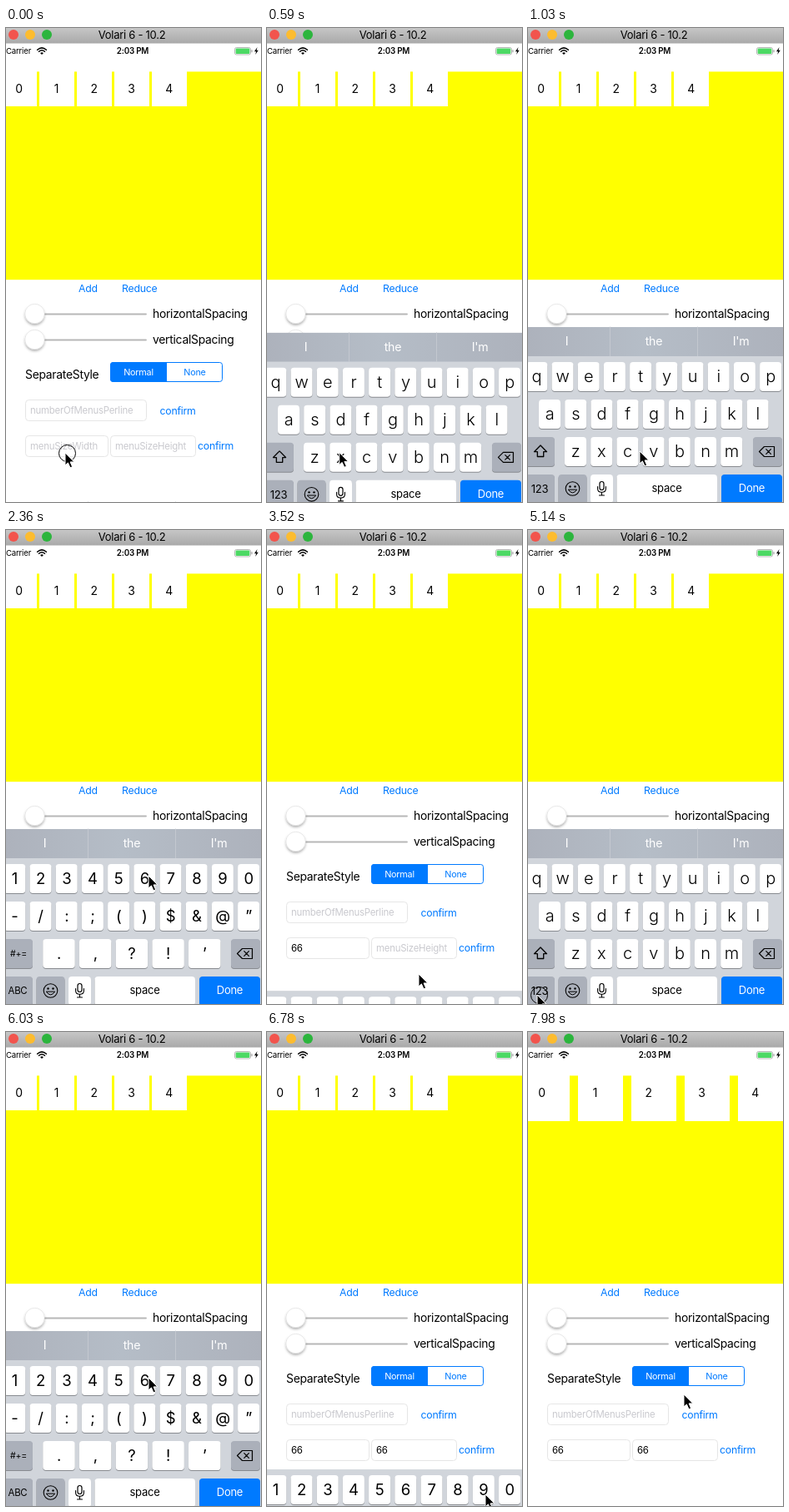
Write an HTML page that moves like this. It is 306 by 569 pixels and loops after 8000 ms.

```html
<!DOCTYPE html>
<html lang="en">
<head>
<meta charset="utf-8">
<title>Menu settings demo</title>
<style>
html, body { margin: 0; width: 100%; height: 100%; overflow: hidden; background: #fff }
svg { display: block }
text { font-family: Inter, "Open Sans", sans-serif; letter-spacing: -.02em; white-space: pre }
</style>
</head>
<body>
<svg id="stage" width="306" height="569" viewBox="0 0 306 569"></svg>
<script>
const BLUE = '#007aff', HINT = '#c9c9ce', KEY_DARK = '#abb0ba';
const STEP = 147, LOOP = 8000;
const $ = id => document.getElementById(id);

const rect = (x, y, w, h, fill, more = '') =>
  `<rect x="${x}" y="${y}" width="${w}" height="${h}" fill="${fill}" ${more}/>`;
const text = (x, y, size, str, fill = '#000', more = '') =>
  `<text x="${x}" y="${y}" font-size="${size}" fill="${fill}" ${more}>${str.replace('&', '&amp;')}</text>`;
const mid = (x, y, size, str, fill, more = '') =>
  text(x, y, size, str, fill, 'text-anchor="middle" ' + more);
const dot = (x, y, r, fill, more = '') =>
  `<circle cx="${x}" cy="${y}" r="${r}" fill="${fill}" ${more}/>`;
const line = (d, width = 1.3, color = '#000') =>
  `<path d="${d}" fill="none" stroke="${color}" stroke-width="${width}" stroke-linejoin="round" stroke-linecap="round"/>`;

// Window chrome and status bar
const header = () =>
  rect(0, 0, 306, 18.5, 'url(#chrome)') +
  ['#f2544d', '#fdbc2f', '#2cb53d'].map((c, i) => dot(9 + 20 * i, 8, 6, c)).join('') +
  mid(151, 13, 13, 'Volari 6 - 10.2') +
  text(0, 31, 9.6, 'Carrier') +
  line('M37.6 26.3Q43 21.4 48.4 26.3M39.5 28.3Q43 25.2 46.5 28.3', 1.5) +
  '<path d="M41 30Q43 28.4 45 30L43 32Z"/>' +
  mid(152, 31, 9.8, '2:03 PM', '#000', 'font-weight="600"') +
  rect(274.5, 23.5, 19, 8.5, 'none', 'rx="2" stroke="#a5a5a5" stroke-width=".8"') +
  rect(275.6, 24.6, 16.8, 6.3, '#4cd964', 'rx="1"') +
  rect(294.4, 26.2, 1.2, 3, '#a5a5a5') +
  '<path d="M301.5 23L298 28.3H300.2L299.2 32L302.8 26.8H300.6Z"/>';

const slider = (y, label) =>
  line(`M34 ${y + .5}H168`, 1.8, '#b7b7b7') +
  dot(34.5, y, 11.7, '#fff', 'stroke="#d4d4d4" stroke-width=".5" filter="url(#soft)"') +
  text(176, y + 5, 13.9, label);

const field = (x, y, w, hint, id) =>
  rect(x + .5, y + .5, w, 25, '#fff', 'rx="4" stroke="#e6e6e6"') +
  text(x + 6, y + 17, 11.4, hint, HINT, `id="${id}"`);

const form = () =>
  text(87, 316.5, 12.3, 'Add', BLUE) + text(139, 316.5, 12.3, 'Reduce', BLUE) +
  slider(343, 'horizontalSpacing') + slider(374, 'verticalSpacing') +
  text(23, 421, 13.9, 'SeparateStyle') +
  rect(125.5, 401.5, 134, 23, '#fff', `rx="3" stroke="${BLUE}"`) +
  `<path d="M193 401H129Q125 401 125 405V421Q125 425 129 425H193Z" fill="${BLUE}"/>` +
  mid(159, 417, 10.8, 'Normal', '#fff') + mid(226.5, 417, 10.8, 'None', BLUE) +
  field(23, 446, 145, 'numberOfMenusPerline', 'perLine') +
  field(23, 489, 99, 'menuSizeWidth', 'width') +
  field(125, 489, 102, 'menuSizeHeight', 'height') +
  text(184.5, 464, 12.3, 'confirm', BLUE) + text(230, 506, 12.3, 'confirm', BLUE);

// Keyboard
const key = (x, y, w, fill = '#fff') =>
  rect(x, y + 1, w, 35, '#888b90', 'rx="4"') + rect(x, y, w, 35, fill, 'rx="4"');
const row = (chars, x, y, pitch, w, size, weight = 400) => [...chars].map((c, i) => {
  const cx = x + i * pitch;
  return key(cx - w / 2, y, w) + mid(cx, y + 24, size, c, '#000', `font-weight="${weight}"`);
}).join('');

const letters = () =>
  row('qwertyuiop', 10.3, 401, 31.2, 26, 20, 300) +
  row('asdfghjkl', 26, 446, 31.2, 26, 20, 300) +
  row('zxcvbnm', 57, 491, 31.2, 26, 20, 300) +
  line('M15 501L7.5 508.7H11.3V514.5H18.7V508.7H22.5Z') +
  mid(14, 558, 13, '123');

const digits = () =>
  row('1234567890', 10.3, 401, 31.2, 26, 18.5) +
  row('-/:;()$&@”', 10.3, 446, 31.2, 26, 18.5) +
  row('.,?!’', 63.5, 491, 43.7, 38.5, 18.5) +
  mid(15, 512, 10.5, '#+=') + mid(14, 557, 11.4, 'ABC');

const keyboard = () =>
  `<g id="bar">${rect(0, 359, 306, 35, 'url(#hints)')}${line('M98.5 359V394M203.5 359V394', 1, '#c3c8cf')}` +
  mid(46.5, 381, 14.2, 'I', '#fff') + mid(151, 381, 14.2, 'the', '#fff') + mid(255.5, 381, 14.2, "I'm", '#fff') + '</g>' +
  rect(0, 394, 306, 176, '#d1d5db') +
  key(-4, 491, 36, KEY_DARK) + key(270, 491, 35, KEY_DARK) +
  key(-4, 536, 36, KEY_DARK) + key(36.5, 536, 34, KEY_DARK) +
  key(75, 536, 27) + key(106.5, 536, 120.5) + key(232, 536, 73, BLUE) +
  line('M283.5 502.5H295.5V514.5H283.5L277.5 508.5ZM285.8 505.7L291.4 511.3M291.4 505.7L285.8 511.3', 1.2) +
  dot(53.5, 553, 8.3, 'none', 'stroke="#000" stroke-width="1.1"') +
  dot(50.5, 550.5, 1.2, '#000') + dot(56.5, 550.5, 1.2, '#000') +
  line('M48.5 554.5Q53.5 561.5 58.5 554.5Z', 1) +
  rect(86, 544.5, 5, 10, 'none', 'rx="2.5" stroke="#000" stroke-width="1.2"') +
  line('M83.6 550.5V553Q83.6 557.3 88.5 557.3T93.4 553V550.5M88.5 557.5V561M85.5 561H91.5', 1.1) +
  mid(166.5, 557, 13, 'space') + mid(268.5, 557, 13, 'Done', '#fff') +
  `<g id="letters">${letters()}</g><g id="digits">${digits()}</g>` +
  `<g id="popup"><path d="M149 346.5H184Q190 346.5 190 352.5V384C190 394 179.5 393 179.5 403V432Q179.5 436 175.5 436H157.5Q153.5 436 153.5 432V403C153.5 393 143 394 143 384V352.5Q143 346.5 149 346.5Z" fill="#fff" stroke="#b4b7bd" stroke-width=".7"/>` +
  mid(166.5, 384, 29, '6') + '</g>';

$('stage').innerHTML = `<defs>
  <linearGradient id="chrome" x2="0" y2="1"><stop stop-color="#c6c6c6"/><stop offset="1" stop-color="#a9a9a9"/></linearGradient>
  <linearGradient id="hints"><stop stop-color="#adb2bc"/><stop offset=".45" stop-color="#b5bdc7"/><stop offset="1" stop-color="#adb2bc"/></linearGradient>
  <filter id="soft" x="-40%" y="-40%" width="180%" height="190%"><feDropShadow dx="0" dy="2" stdDeviation="1.5" flood-opacity=".3"/></filter>
</defs>` + rect(0, 0, 306, 569, '#fff') + header() + rect(0, 52.4, 306, 249.8, '#ff0') +
  '<g id="menus"></g>' + form() + `<g id="kb">${keyboard()}</g>` +
  `<g id="cursor">${dot(2.5, .5, 10, 'none', 'id="ring" stroke="#000"')}
  <path d="M0 0V15L3.4 11.9L6 17.8L8.6 16.7L6.1 10.9H10.8Z" stroke="#fff" stroke-width="1"/></g>`;

const menus = big => {
  const left = big ? -4 : -5, size = big ? 54 : 42, pitch = big ? 64 : 45;
  return [0, 1, 2, 3, 4].map(i => {
    const x = left + i * pitch;
    return rect(x, 52, size, big ? 55 : 42, '#fff') + mid(x + 20.5, 78, 13.9, String(i));
  }).join('');
};

// Pointer path: step, x, y
const path = [
  [0, 71, 510], [3, 71, 510], [7, 134, 508], [8, 122, 514], [10, 11, 558], [12, 11, 558],
  [16, 171, 415], [19, 171, 415], [21, 260, 556], [22, 260, 556], [24, 182, 533],
  [25, 180, 503], [31, 180, 503], [34, 11, 558], [36, 11, 558], [39, 171, 415],
  [42, 171, 415], [44, 262, 555], [47, 262, 555], [49, 254, 501], [51, 254, 501], [54, 187, 435]
];
const clicks = [0, 11, 17, 19, 21, 26, 35, 40, 42, 44, 51];
const popups = [17, 19, 40, 42];

function pointer(n) {
  const i = Math.max(1, path.findIndex(p => p[0] >= n));
  const [a, x0, y0] = path[i - 1], [b, x1, y1] = path[i];
  const k = (n - a) / (b - a);
  return [x0 + (x1 - x0) * k, y0 + (y1 - y0) * k];
}

// Share of the slide still to go, k steps after it was triggered
const rest = k => k >= 5 ? 0 : Math.min(1, 1.93 * Math.exp(-1.02 * k));

const show = (id, on) => $(id).setAttribute('display', on ? 'inline' : 'none');
const move = (id, x, y) => $(id).setAttribute('transform', `translate(${x} ${y})`);
function fill(id, hint, value) {
  $(id).textContent = value || hint;
  $(id).setAttribute('fill', value ? '#000' : HINT);
}

let last = -1;
function draw(n) {
  const second = n >= 26;
  const [open, swap, close] = second ? [26, 36, 44] : [0, 12, 21];
  const closing = n > close;
  const shift = closing ? 175 * (1 - rest(n - close)) : 210 * rest(n - open);
  move('kb', 0, shift);
  show('bar', !closing);
  show('letters', n < swap);
  show('digits', n >= swap);
  show('popup', popups.includes(n));
  fill('width', 'menuSizeWidth', n < 17 ? '' : n < 19 ? '6' : '66');
  fill('height', 'menuSizeHeight', n < 40 ? '' : n < 42 ? '6' : '66');
  $('menus').innerHTML = menus(n >= 52);
  move('cursor', ...pointer(n));
  show('ring', clicks.includes(n));
}

function tick() {
  const n = Math.min(54, Math.floor((performance.now() % LOOP + 10) / STEP));
  if (n !== last) draw(last = n);
  requestAnimationFrame(tick);
}
tick();
</script>
</body>
</html>
```
